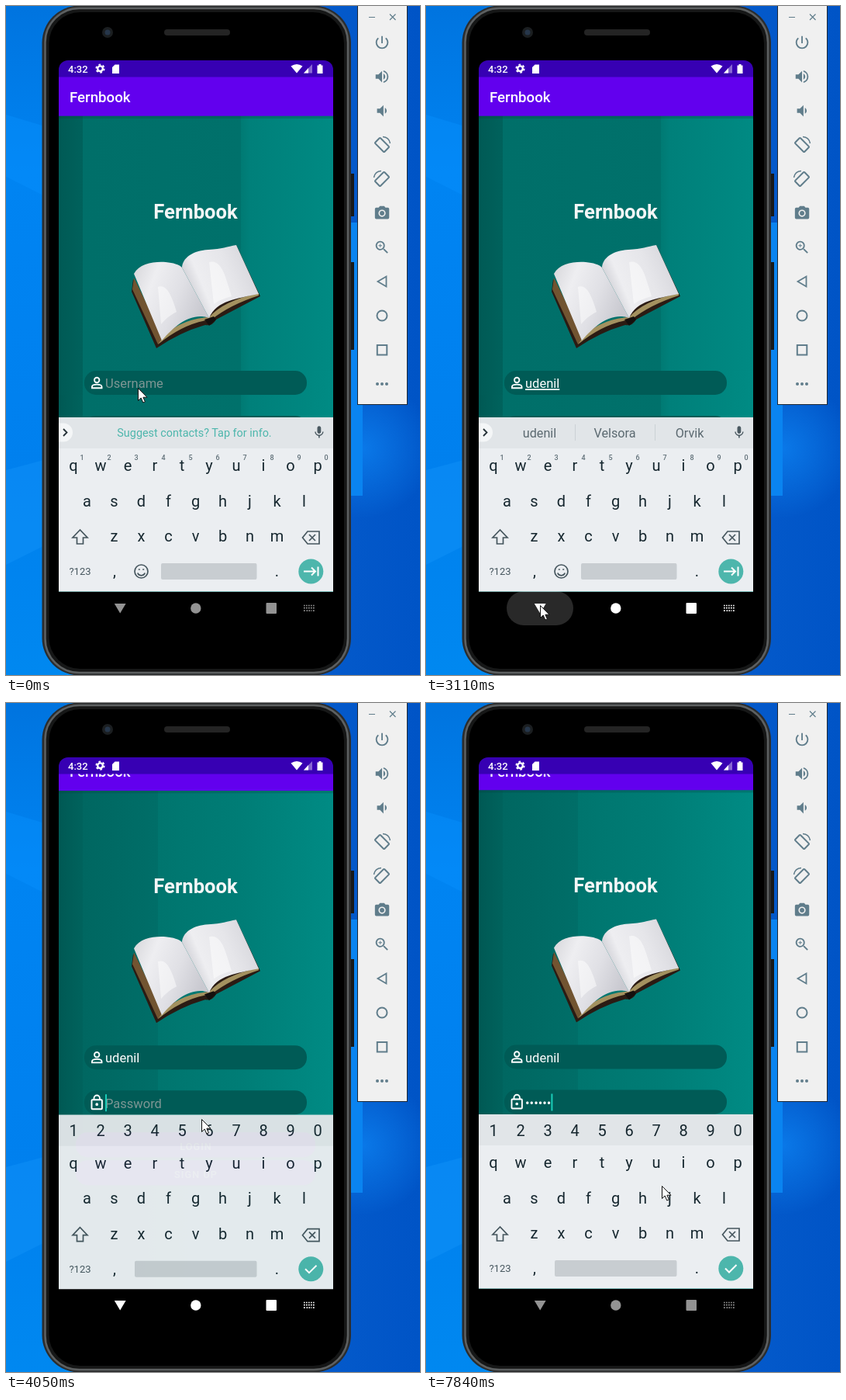
These frames come from a looping animation (534 by 862 pixels, 7.99 s). An HTML page:

```html
<!DOCTYPE html>
<html lang="en">
<head>
<meta charset="utf-8">
<title>Phone login</title>
<style>
html, body { margin: 0; width: 100%; height: 100%; overflow: hidden; background: #0a6ad8; }
svg { display: block; width: 534px; height: 862px; font-family: Roboto, sans-serif; }
.mid text, text.mid { text-anchor: middle; }
.line { fill: none; stroke: #607d8b; stroke-width: 2; }
.key { font-size: 20px; fill: #16272f; }
.hint { fill: #7e9694; }
</style>
</head>
<body>
<svg id="stage" viewBox="0 0 534 862" xmlns="http://www.w3.org/2000/svg">
<defs>
  <linearGradient id="left" x2="0" y2="1">
    <stop stop-color="#0074df"/><stop offset=".25" stop-color="#0084f2"/>
    <stop offset=".7" stop-color="#0080ee"/><stop offset="1" stop-color="#0088f0"/>
  </linearGradient>
  <linearGradient id="right"><stop stop-color="#0a62d2"/><stop offset="1" stop-color="#0054c6"/></linearGradient>
  <radialGradient id="glow" cx="460" cy="570" r="90" gradientUnits="userSpaceOnUse">
    <stop stop-color="#0a78e8"/><stop offset="1" stop-color="#0a78e8" stop-opacity="0"/>
  </radialGradient>
  <linearGradient id="fine">
    <stop stop-color="#005954"/><stop offset=".088" stop-color="#00635d"/>
    <stop offset=".088" stop-color="#006761"/><stop offset=".36" stop-color="#006e68"/>
    <stop offset=".362" stop-color="#00756e"/><stop offset=".66" stop-color="#007d76"/>
    <stop offset="1" stop-color="#008b84"/>
  </linearGradient>
  <linearGradient id="coarse">
    <stop stop-color="#005a55"/><stop offset=".088" stop-color="#00625c"/>
    <stop offset=".088" stop-color="#006f69"/><stop offset=".664" stop-color="#00716b"/>
    <stop offset=".664" stop-color="#007a73"/><stop offset=".695" stop-color="#00807a"/>
    <stop offset="1" stop-color="#008a83"/>
  </linearGradient>
  <linearGradient id="pageL" x2="1" y2=".4">
    <stop stop-color="#d6d6da"/><stop offset=".3" stop-color="#eeeef1"/>
    <stop offset=".65" stop-color="#e0e0e5"/><stop offset="1" stop-color="#c9c9d0"/>
  </linearGradient>
  <linearGradient id="pageR" y1=".6" x2="1" y2=".2">
    <stop stop-color="#c4c4cb"/><stop offset=".25" stop-color="#eeeef1"/>
    <stop offset=".6" stop-color="#e6e6ea"/><stop offset="1" stop-color="#d3d3d9"/>
  </linearGradient>
  <clipPath id="screen"><path d="M68 755V82a12 12 0 0 1 12-12H410a12 12 0 0 1 12 12V755z"/></clipPath>
  <clipPath id="view"><path d="M68 91H422V755H68z"/></clipPath>
</defs>

<g id="desktop">
  <path fill="url(#left)" d="M0 0H240V862H0z"/>
  <path fill="#0a93ff" opacity=".35" d="M0 140L60 158V250L0 220z"/>
  <path fill="#20a0ff" opacity=".25" d="M0 598L60 582V690L0 720z"/>
  <path fill="url(#right)" d="M240 0H534V862H240z"/>
  <path fill="url(#glow)" d="M370 480H534V660H370z"/>
  <path fill="#0a84f0" d="M108 279H460V631H108z"/>
</g>

<g id="phone">
  <path fill="#17191a" d="M443 216h6v55h-6zM443 330h6v113h-6z"/>
  <rect x="46.500" y="-.5" width="398.500" height="863" rx="48" fill="#2b2d2e"/>
  <rect x="50.500" y="3" width="390.500" height="856" rx="44" fill="#161717" stroke="#5d6061" stroke-width="2.500"/>
  <rect x="55.500" y="8" width="380.500" height="846" rx="40"/>
  <circle cx="131" cy="34" r="7" fill="#1b1e20"/><circle cx="131" cy="34" r="3.500" fill="#26364a"/>
  <rect x="204" y="30" width="85" height="8" rx="4" fill="#242424"/>
</g>

<g clip-path="url(#screen)">
  <g clip-path="url(#view)"><g id="app">
    <path fill="url(#fine)" d="M68 140H422V800H68z"/>
    <path id="bands" fill="url(#coarse)" d="M68 140H422V470H388V528H99V501H68z"/>
    <path fill="#6200ee" d="M68 91H422V141.800H68z"/>
    <path fill="#003c38" opacity=".25" d="M68 141.800H422V145H68z"/>
    <text x="82" y="124" font-size="18.700" font-weight="500" fill="#fff">Fernbook</text>
    <text class="mid" x="244.500" y="273.500" font-size="25.600" font-weight="700" fill="#f4f6f6">Fernbook</text>
    <g id="book">
      <path fill="#2b1b13" d="M162 368L164 352L200 420L262 400L297 308L328 374L271 404Q266 413 257 411Q225 420 194 441z"/>
      <path fill="#715431" d="M163 365L165 350L203 428L196 436z"/>
      <path fill="#a3915f" d="M196 436L201 429Q222 404 262 401Q280 380 326 370L326 373Q289 385 265 404Q230 408 196 436z"/>
      <path fill="url(#pageL)" d="M165 345C172 332 190 329 206 330C216 331 223 333 227 337L262 402C240 394 219 410 201 431z"/>
      <path fill="url(#pageR)" d="M227 337C228 323 243 315 261 314S285 310 297 308L326 371C298 377 272 379 262 402z"/>
      <path fill="#fff" opacity=".5" d="M196 362C206 358 213 370 220 394Q208 400 200 410zM262 330Q276 326 284 352L291 374Q276 378 268 384z"/>
      <path fill="#15100e" d="M256 404L268 400L271 404L262 412z"/>
    </g>
    <g fill="#005b56">
      <rect x="101" y="470" width="287" height="31" rx="15"/>
      <rect x="101" y="528" width="287" height="31" rx="15"/>
    </g>
    <g fill="none" stroke="#fff" stroke-width="1.900">
      <circle cx="117.200" cy="482" r="3.200"/>
      <path d="M111 492.200V490.500C111 486.700 123.500 486.700 123.500 490.500V492.200z"/>
      <rect x="110.500" y="540" width="13.400" height="12" rx="1"/>
      <path d="M113.500 540V538a3.700 3.700 0 0 1 7.400 0V540"/>
      <circle cx="117.200" cy="546" r=".9"/>
    </g>
    <g font-size="16.500" fill="#fff">
      <text id="user" x="128" y="492.300"></text>
      <text id="pass" x="128" y="550.500"></text>
    </g>
    <rect id="caret" width="2" height="22" fill="#19cdb8"/>
    <g id="buttons" class="mid" font-size="12.600" font-weight="500" letter-spacing="1.100" fill="#fff"></g>
  </g></g>
  <path fill="#3700b3" d="M68 70H422V91.500H68z"/>
  <g fill="#fff">
    <text x="80" y="85.500" font-size="13" font-weight="500">4:32</text>
    <circle cx="121.500" cy="80.700" r="3.300" fill="none" stroke="#fff" stroke-width="2.400"/>
    <circle cx="121.500" cy="80.700" r="5.200" fill="none" stroke="#fff" stroke-width="1.800" stroke-dasharray="2.700 2.745"/>
    <path d="M140.500 75.500H146V87H137V79z"/>
    <path d="M367.500 77.500Q375 72.500 382.500 77.500L375 86.500z"/>
    <path d="M395 75V86.500H384z" opacity=".4"/><path d="M390 80V86.500H384z"/>
    <path d="M403.500 75H406.500V76.500H408.500V87H401.500V76.500H403.500z"/>
  </g>
</g>

<g id="kb">
  <path fill="#ebeef1" d="M68 530H422V754.500H68z"/>
  <path fill="#e1e5e8" d="M68 530H422V570H68z"/>
  <g id="strip">
    <path fill="#f4f6f7" d="M68 537.500H74a12 12 0 0 1 0 24H68z"/>
    <path d="M74 545l4.500 4.500l-4.500 4.500" fill="none" stroke="#263238" stroke-width="1.800"/>
    <path transform="translate(394.300 539.700) scale(.8)" fill="#4b5a62" d="M12 14c1.660 0 3-1.340 3-3V5c0-1.660-1.340-3-3-3S9 3.340 9 5v6c0 1.660 1.340 3 3 3zm5.300-3c0 3-2.540 5.100-5.300 5.100S6.700 14 6.700 11H5c0 3.410 2.720 6.230 6 6.720V21h2v-3.280c3.280-.480 6-3.300 6-6.720z"/>
    <text id="offer" class="mid" x="243" y="555" font-size="14.400" fill="#4db6ac">Suggest contacts? Tap for info.</text>
    <g id="words" class="mid" font-size="16.200" fill="#5b6970">
      <path fill="#cbd1d5" d="M192 539h1v21h-1zM295 539h1v21h-1z"/>
      <text x="146.500" y="555.800"></text><text x="243.500" y="555.800"></text><text x="340" y="555.800"></text>
    </g>
    <g id="minis" class="mid" font-size="9" font-weight="500" fill="#5f6f77"></g>
    <g fill="none" stroke="#46565e" stroke-width="1.700">
      <circle cx="174.500" cy="728.500" r="8.500"/><path d="M169.800 730.500a5 5 0 0 0 9.400 0"/>
      <path d="M170.800 726h2M176.200 726h2"/>
    </g>
  </g>
  <g id="digits" class="mid key"></g>
  <g id="keys" class="mid key"></g>
  <g fill="none" stroke="#46565e" stroke-width="1.700">
    <path d="M95.500 675L86 685H91.500V693H99.500V685H105z"/>
    <path d="M389 677H404V693H389L382.500 685zM391 681l8 8M399 681l-8 8"/>
  </g>
  <text class="mid" x="95.500" y="733" font-size="13" fill="#46565e">?123</text>
  <rect id="space" y="718" height="21" rx="2" fill="#c8cdd1"/>
  <circle cx="393.300" cy="728.500" r="16" fill="#4db6ac"/>
  <path id="go" fill="none" stroke="#fff" stroke-width="2"/>
</g>

<g id="nav">
  <rect id="ripple" x="104" y="754" width="86" height="44" rx="22" fill="#fff"/>
  <g id="icons">
    <path id="back"/><circle cx="244.800" cy="776" r="6.700"/><rect x="335.500" y="769" width="13.500" height="14" rx="1"/>
    <path id="ime" fill="none" stroke-width="1.700" stroke-dasharray="1.700 1.300" d="M384 772.500H398M384 775.700H398M384 779.200H386M387.500 779.200H394.500M396 779.200H398"/>
  </g>
</g>

<g id="panel">
  <rect x="453.500" y="-1" width="64" height="514.500" fill="#f0f0f0" stroke="#1c2733"/>
  <path class="line" style="stroke-width:1.200" d="M468 14.500h8M495 10.500l7.500 7.500M502.500 10.500l-7.500 7.500"/>
  <g id="tools" fill="#607d8b"></g>
  <g id="turn" class="line">
    <rect x="-4.800" y="-8.500" width="9.600" height="17" rx="1" transform="rotate(-45)"/>
    <path style="stroke-width:1.500" d="M1 -10.500Q9 -10 10.500 -2"/>
  </g>
  <use id="turn2" href="#turn"/>
  <g class="line">
    <path d="M490.500 348.500V361.500L479.500 355z" stroke-width="1.800"/>
    <circle cx="485" cy="399" r="6.500"/><rect x="478.800" y="437" width="12.500" height="12.500"/>
  </g>
  <g fill="#607d8b"><circle cx="479" cy="487" r="2"/><circle cx="485" cy="487" r="2"/><circle cx="491" cy="487" r="2"/></g>
</g>

<path id="mouse" fill="#fff" stroke="#111" d="M.5 .5V16.500L4.200 13L6.800 19L9.400 17.900L6.900 12.200H12z"/>
</svg>
<script>
const LOOP = 7990;
const $ = id => document.getElementById(id);
const set = (id, attrs) => { for (const k in attrs) $(id).setAttribute(k, attrs[k]); };
const show = (id, on) => { $(id).style.display = on ? '' : 'none'; };
const label = (x, y, s) => `<text x="${x}" y="${y}">${s}</text>`;
const row = (s, x, y) => [...s].map((c, i) => label(x + i * 35, y, c)).join('');

$('keys').innerHTML = row('qwertyuiop', 87, 599.3) + row('asdfghjkl', 104.5, 644.5) +
  row('zxcvbnm', 139.5, 690) + label(140, 735, ',') + label(349.5, 735, '.');
$('digits').innerHTML = row('1234567890', 87, 557.7);
$('minis').innerHTML = row('1234567890', 98, 585);
$('buttons').innerHTML = [['LOGIN', 582], ['SIGN UP', 618]].map(([s, y]) =>
  `<rect x="90" y="${y + 1.5}" width="309" height="32" rx="15" fill="#002f2c" opacity=".3"/>
   <rect x="90" y="${y}" width="309" height="32" rx="15" fill="#6200ee"/>` + label(245, y + 22.8, s)).join('');

const tools = {
  47: 'M13 3h-2v10h2zM17.830 5.170l-1.420 1.420C17.990 7.860 19 9.810 19 12a7 7 0 0 1-14 0c0-2.190 1.010-4.140 2.580-5.420L6.170 5.170C4.230 6.820 3 9.260 3 12a9 9 0 0 0 18 0c0-2.740-1.230-5.180-3.170-6.830z',
  91: 'M3 9v6h4l5 5V4L7 9zM16.500 12c0-1.770-1-3.290-2.500-4v8c1.500-.700 2.500-2.200 2.500-4zM14 3.230v2.060a7 7 0 0 1 0 13.420v2.060a9 9 0 0 0 0-17.540z',
  135: 'M18.500 12c0-1.770-1-3.290-2.500-4v8c1.500-.700 2.500-2.200 2.500-4zM5 9v6h4l5 5V4L9 9z',
  267: 'M9 2L7.200 4H4a2 2 0 0 0-2 2v12a2 2 0 0 0 2 2h16a2 2 0 0 0 2-2V6a2 2 0 0 0-2-2h-3.200L15 2zM12 17a5 5 0 0 1 0-10a5 5 0 0 1 0 10zM12 8.800a3.200 3.200 0 0 0 0 6.400a3.200 3.200 0 0 0 0-6.400z',
  311: 'M15.500 14h-.800l-.300-.300A6.500 6.500 0 1 0 13.700 14.400l.300.300v.800l5 5L20.500 19zM9.500 14a4.500 4.500 0 1 1 0-9a4.500 4.500 0 0 1 0 9zM12 10h-2v2H9v-2H7V9h2V7h1v2h2z'
};
$('tools').innerHTML = Object.entries(tools).map(([y, d]) =>
  `<path fill-rule="evenodd" transform="translate(474 ${y - 11}) scale(.92)" d="${d}"/>`).join('');
set('turn', { transform: 'translate(485 179)' });
set('turn2', { transform: 'translate(970 44) scale(-1 1)' });

// Step tracks: [start ms, value...]
const mouse = [[0, 170, 492], [280, 171, 498], [420, 173, 512], [560, 175, 530], [700, 176, 540],
  [1010, 174, 520], [1160, 173, 506], [2570, 171, 560], [2700, 160, 670], [2840, 147, 772],
  [3120, 190, 715], [3260, 258, 619], [3410, 254, 562], [3530, 252, 536], [7720, 290, 600], [7840, 304, 622]];
const name = [[0, ''], [1440, 'u'], [1720, 'ud'], [1850, 'ude'], [1980, 'udeni'], [2110, 'udenil']];
const words = [[0], [1720, 'ud', 'under', 'used'], [1850, 'ude', 'under', 'Orvik'],
  [1980, 'udeni', 'Velsora', 'Orvik'], [2110, 'udenil', 'Velsora', 'Orvik'], [3260]];
const secret = [[0, ''], [4880, 'a'], [5130, '•b'], [5410, '•••k'], [5530, '••••i'], [5660, '•••••r'], [7160, '••••••']];
const caret = [[0, 0], [280, 1], [700, 0], [1160, 1], [2700, 0], [3120, 1], [6160, 0], [6640, 1], [7160, 0], [7720, 1]];
const board = [[0, 1, 0], [3260, .7, 16], [3410, 0, 0], [4050, .97, .7], [4170, 1, 0]]; // opacity, drop
const ripple = [[0, 0], [2980, .16], [3260, .13], [3410, .06], [3530, 0]];
const pan = [[0, 0], [4050, -28.8], [4170, -29.5]];

const at = (track, t) => track.findLast(s => s[0] <= t).slice(1);

function field(id, text, hint) {
  $(id).textContent = text || hint;
  $(id).setAttribute('class', text ? '' : 'hint');
  return 128 + (text ? $(id).getComputedTextLength() : 0);
}

function draw(t) {
  const onPass = t >= 3680, hidden = t >= 3260 && t < 3930;
  const [mx, my] = at(mouse, t), [alpha, drop] = at(board, t), offers = at(words, t);

  const ends = [field('user', at(name, t)[0], 'Username'), field('pass', at(secret, t)[0], 'Password')];
  $('user').style.textDecoration = t >= 1440 && t < 3260 ? 'underline' : 'none';
  set('caret', { x: ends[+onPass], y: onPass ? 533 : 475, opacity: at(caret, t)[0] });
  set('app', { transform: `translate(0 ${at(pan, t)[0]})` });
  show('bands', t < 4050);

  set('kb', { opacity: alpha, transform: `translate(0 ${drop})` });
  show('strip', !onPass);
  show('digits', onPass);
  show('offer', t < 1720);
  show('words', offers.length);
  $('words').querySelectorAll('text').forEach((el, i) => { el.textContent = offers[i] || ''; });
  set('space', { x: onPass ? 166 : 200, width: onPass ? 157.5 : 123.5 });
  set('go', { d: onPass ? 'M386 728.500l5 5l9.500-9.500' : 'M384 728.500H399M394 723.500l5 5l-5 5M402.500 722.500V734.500' });

  const dim = t < 2840 ? 1 : Math.min(1, Math.max(0, (t - 5660) / 740));
  const tone = Math.round(255 - 108 * dim);
  const color = `rgb(${tone},${tone},${tone})`;
  set('icons', { fill: color });
  set('ime', { stroke: color });
  show('ime', !hidden);
  set('back', { d: hidden ? 'M152.500 769V783L139.500 776z' : 'M139.800 770H154.600L147.200 782.500z' });
  set('ripple', { opacity: at(ripple, t)[0] });
  set('mouse', { transform: `translate(${mx} ${my})` });
}

const start = performance.now();
function tick() {
  draw((performance.now() - start) % LOOP);
  requestAnimationFrame(tick);
}
tick();
</script>
</body>
</html>
```
